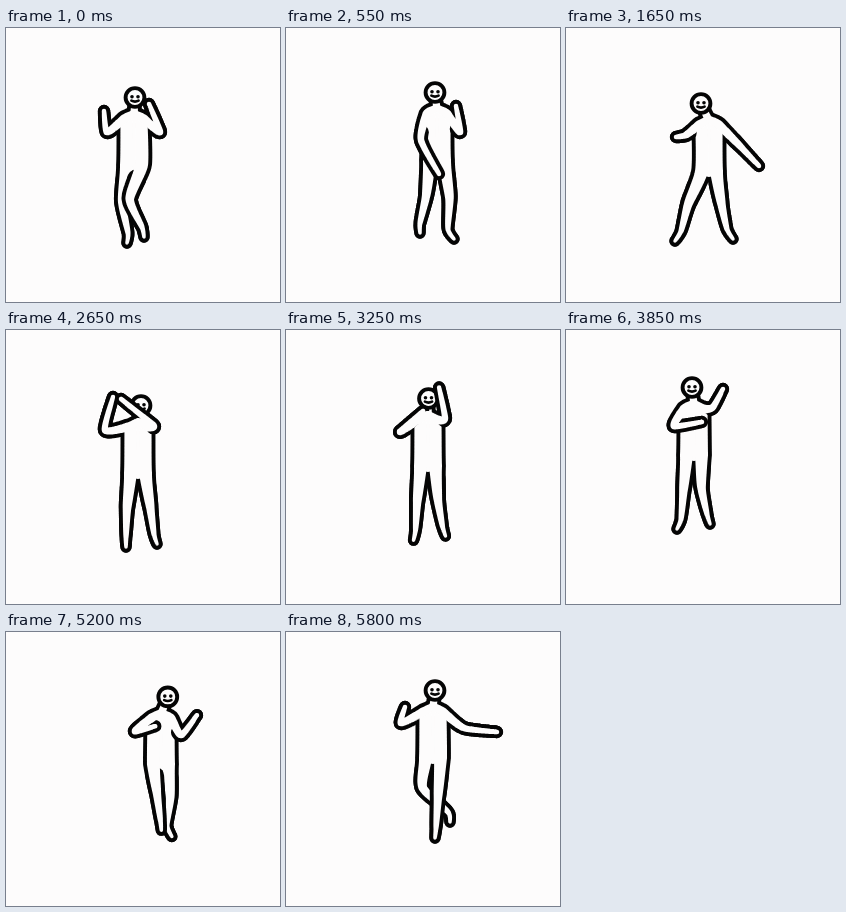
These frames come from a looping animation (274x274 px, 5.85 s). An HTML page with a canvas:

```html
<!DOCTYPE html>
<html lang="en">
<head>
<meta charset="utf-8">
<title>Dancing figure</title>
<style>
html, body { margin: 0; width: 100%; height: 100%; overflow: hidden; background: #fdfcfc; }
canvas { display: block; width: 100vw; height: 100vh; }
</style>
</head>
<body>
<canvas id="stage"></canvas>
<script>
const SIZE = 274, LOOP = 5850, STEP = 50;
const PAPER = '#fdfcfc', INK = '#050505', HALF = 1.95;
const canvas = document.getElementById('stage');
const ctx = canvas.getContext('2d');

// Body proportions. "open" is the joint position where an outline begins to
// show on top of the torso.
const HEAD_R = 9.4, NECK = 21.5, SPINE = 46, SHOULDER = 10, HIP = 7.5, FOOT = 10;
const ARM = { radii: [5, 6.5, 5.2, 4.2], open: 1.7 };
const SIDE = { radii: [8, 8.5, 6.3, 4.5, 3.7], open: 1.4 };
const LIMBS = { armL: ARM, armR: ARM, sideL: SIDE, sideR: SIDE };

// chest: centre between the shoulders; lean: sideways offset of the head;
// arms: elbow and hand; legs: toe x, toe y, foot turn, knee bend.
const tiptoe = {
  chest: [128, 91], lean: 1, front: 'sideR',
  arms: [[[101, 104], [98, 83]], [[154, 104], [143, 76]]],
  legs: [[121, 215, -1, -5], [138, 209, 2, -12]]
};
const stroll = {
  chest: [151, 86], lean: -2, front: 'sideR',
  arms: [[[135, 112], [153, 146]], [[174, 104], [170, 78]]],
  legs: [[134, 205, 0, 2], [168, 211, 6, 3]]
};
const stride = {
  chest: [143, 97], lean: -8, front: 'sideR',
  arms: [[[120, 107], [110, 109]], [[174, 118], [193, 138]]],
  legs: [[109, 213, -6, -2], [167, 211, 6, -1]]
};
const shield = {
  chest: [132, 97], lean: 3, front: 'sideR',
  arms: [[[99, 100], [107, 67]], [[147, 95], [115, 69]]],
  legs: [[120, 217, 0, -1], [151, 214, 3, 0]]
};
const robot = {
  chest: [128, 79], lean: -2, front: 'sideL',
  arms: [[[108, 96], [136, 92]], [[147, 77], [157, 59]]],
  legs: [[111, 199, -4, 0], [144, 194, 3, -3]]
};
const think = {
  chest: [162, 92], lean: 11, front: 'sideL',
  arms: [[[141, 105], [160, 121]], [[175, 105], [171, 87]]],
  legs: [[152, 193, 0, 9], [181, 200, 11, 4]]
};
const kick = {
  chest: [147, 80], lean: 2, front: 'sideR',
  arms: [[[115, 91], [119, 75]], [[178, 96], [211, 100]]],
  legs: [[164, 190, 2, -15], [149, 206, -1, 0]]
};

const lerp = (a, b, k) => a + (b - a) * k;
const mix = (p, q, k) => p.map((v, i) => lerp(v, q[i], k));

// Works out all joints, then moves the figure and mirrors it if asked.
function build({ chest: [cx, cy], lean, arms, legs, front }, dx, dy, flip) {
  const place = ([x, y]) => [(flip ? 2 * cx - x : x) + dx, y + dy];
  const arm = (i, s) => [[cx, cy - 6], [cx + s * SHOULDER, cy], ...arms[i]].map(place);
  const side = (i, s) => {
    const [tx, ty, turn, bend] = legs[i];
    const hip = [cx + s * HIP, cy + SPINE], ankle = [tx - turn, ty - FOOT];
    const [kx, ky] = mix(hip, ankle, 0.55);
    return [[cx + s * HIP, cy + 4], hip, [kx + bend, ky], ankle, [tx, ty]].map(place);
  };
  const [l, r] = flip ? ['R', 'L'] : ['L', 'R'];
  return {
    head: place([cx + lean, cy - NECK]),
    chest: place([cx, cy]),
    ['arm' + l]: arm(0, -1), ['arm' + r]: arm(1, 1),
    ['side' + l]: side(0, -1), ['side' + r]: side(1, 1),
    front: (front === 'sideL') !== flip ? 'sideL' : 'sideR'
  };
}

const key = (at, spec, dx = 0, dy = 0, flip = false) => ({ at, ...build(spec, dx, dy, flip) });
const timeline = [
  key(0, tiptoe),
  key(550, stroll),
  key(1150, stride, 5, -4),
  key(1400, stride, -9, -2),
  key(1650, stride),
  key(2650, shield),
  key(3100, shield, 2, 9),
  key(3400, robot, 22, -5),
  key(3850, robot),
  key(4200, kick, -11, -12, true),
  key(4400, kick),
  key(4650, think),
  key(5800, kick)
];

// Turns each bone by the shorter way round, so limbs swing in arcs.
function swing(a, b, k) {
  const out = [mix(a[0], b[0], k)];
  for (let i = 1; i < a.length; i++) {
    const bone = p => [p[i][0] - p[i - 1][0], p[i][1] - p[i - 1][1]];
    const [ax, ay] = bone(a), [bx, by] = bone(b);
    const from = Math.atan2(ay, ax), diff = Math.atan2(by, bx) - from;
    const angle = from + Math.atan2(Math.sin(diff), Math.cos(diff)) * k;
    const len = lerp(Math.hypot(ax, ay), Math.hypot(bx, by), k);
    const [x, y] = out[i - 1];
    out.push([x + len * Math.cos(angle), y + len * Math.sin(angle)]);
  }
  return out;
}

function poseAt(t) {
  let i = 0;
  while (i < timeline.length - 2 && t >= timeline[i + 1].at) i++;
  const a = timeline[i], b = timeline[i + 1];
  const u = Math.min(1, (t - a.at) / (b.at - a.at)), k = u * u * (3 - 2 * u);
  const pose = {
    head: mix(a.head, b.head, k),
    chest: mix(a.chest, b.chest, k),
    front: (k < 0.5 ? a : b).front
  };
  for (const name in LIMBS) pose[name] = swing(a[name], b[name], k);
  return pose;
}

// Sweeps a disc of changing radius along a softly curved chain of points.
function sweep(points, color, grow, start = 0) {
  ctx.fillStyle = color;
  ctx.beginPath();
  const last = points.length - 1;
  const tangent = (i, c) => 0.32 * (points[Math.min(last, i + 1)][c] - points[Math.max(0, i - 1)][c]);
  for (let i = 0; i < last; i++) {
    const p = points[i], q = points[i + 1];
    const n = Math.ceil(Math.hypot(q[0] - p[0], q[1] - p[1]) * 1.6) + 1;
    for (let j = 0; j <= n; j++) {
      const s = j / n;
      if (i + s < start) continue;
      const s2 = s * s, s3 = s2 * s, h = 3 * s2 - 2 * s3;
      const at = c => lerp(p[c], q[c], h)
        + (s3 - 2 * s2 + s) * tangent(i, c) + (s3 - s2) * tangent(i + 1, c);
      const x = at(0), y = at(1), r = lerp(p[2], q[2], s) + grow;
      ctx.moveTo(x + r, y);
      ctx.arc(x, y, r, 0, Math.PI * 2);
    }
  }
  ctx.fill();
}

function drawHead([x, y]) {
  ctx.strokeStyle = INK;
  ctx.lineWidth = HALF * 2;
  ctx.beginPath();
  ctx.arc(x, y, HEAD_R, 0, Math.PI * 2);
  ctx.fillStyle = PAPER;
  ctx.fill();
  ctx.stroke();
  ctx.fillStyle = INK;
  for (const dx of [-3, 3]) {
    ctx.beginPath();
    ctx.arc(x + dx, y - 0.8, 1.8, 0, Math.PI * 2);
    ctx.fill();
  }
  ctx.lineWidth = 2.6;
  ctx.lineCap = 'round';
  ctx.beginPath();
  ctx.moveTo(x - 3.6, y + 3.2);
  ctx.quadraticCurveTo(x, y + 5, x + 3.6, y + 3.2);
  ctx.stroke();
}

function drawFigure(pose) {
  const parts = {};
  for (const name in LIMBS) {
    parts[name] = pose[name].map((p, i) => [...p, LIMBS[name].radii[i]]);
  }
  const [cx, cy] = pose.chest;
  const neck = [[...pose.head, 4.8], [cx, cy - 4, 6]];
  const spine = [[cx, cy, 8], [cx, cy + SPINE, 8]];

  for (const part of [neck, spine, ...Object.values(parts)]) sweep(part, INK, HALF);
  for (const part of [neck, spine]) sweep(part, PAPER, -HALF);

  const limb = name => {
    sweep(parts[name], INK, HALF, LIMBS[name].open);
    sweep(parts[name], PAPER, -HALF);
  };
  limb(pose.front === 'sideL' ? 'sideR' : 'sideL');
  limb(pose.front);
  drawHead(pose.head);
  limb('armL');
  limb('armR');
}

function resize() {
  const ratio = window.devicePixelRatio || 1;
  canvas.width = Math.round(innerWidth * ratio);
  canvas.height = Math.round(innerHeight * ratio);
}

const began = performance.now();
function frame() {
  const t = Math.max(0, performance.now() - began) % LOOP;
  ctx.setTransform(canvas.width / SIZE, 0, 0, canvas.height / SIZE, 0, 0);
  ctx.fillStyle = PAPER;
  ctx.fillRect(0, 0, SIZE, SIZE);
  drawFigure(poseAt(Math.floor(t / STEP) * STEP));
  requestAnimationFrame(frame);
}

addEventListener('resize', resize);
resize();
frame();
</script>
</body>
</html>
```
